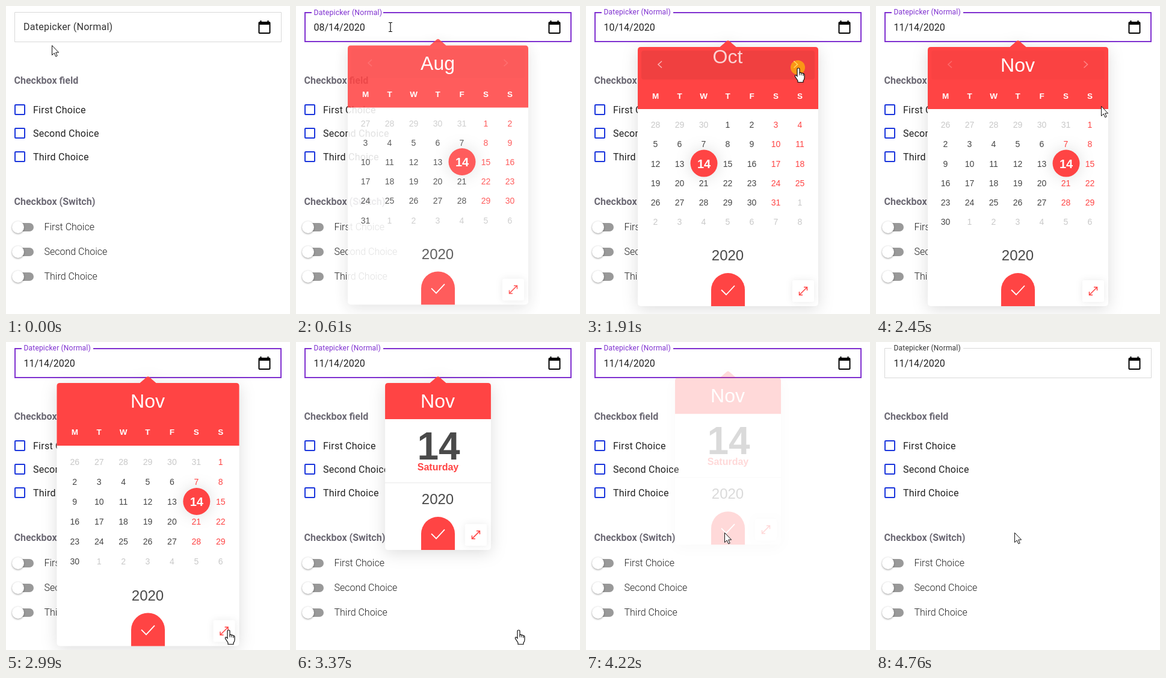
An HTML page that plays this animation: 472x511 px, repeating every 5060 ms.

```html
<!DOCTYPE html>
<html lang="en">
<head>
<meta charset="utf-8">
<title>Date picker</title>
<style>
  html, body { margin: 0; width: 100%; height: 100%; overflow: hidden; background: #fff; }
  svg { display: block; font-family: Roboto, sans-serif; }
  .picker { font-family: "Liberation Sans", Arial, sans-serif; text-anchor: middle; }
  .card { filter: drop-shadow(0 5px 13px #0002); }
  .soft { filter: drop-shadow(0 0 6px #00000014); }
  .day { filter: drop-shadow(0 0 13px #0002); }
  .thumb { filter: drop-shadow(0 1px 1.5px #0006); }
</style>
</head>
<body>
<svg id="stage" width="472" height="511" viewBox="0 0 472 511"></svg>
<script>
const LOOP = 5060, RED = '#ff4444', PURPLE = '#7f30d0';
const TOP = 68, MID = 236;
const HEAD = 60, WEEKDAYS = 43, GRID = 215, SUMMARY = 105, FOOTER = 112;
const MONTHS = ['Aug', 'Sep', 'Oct', 'Nov'];
const CLICKS = [1290, 1540, 1842], UPDATE_DELAY = 200;
const CHOICES = ['First Choice', 'Second Choice', 'Third Choice'];
// time, x, y, cursor shape until the next stop
const STOPS = [
  [0, 76, 65, 'arrow'], [30, 76, 65, 'arrow'], [140, 157, 35, 'beam'],
  [690, 157, 35, 'arrow'], [840, 290, 152, 'hand'],
  [1150, 353, 104, 'hand'], [1450, 353, 103, 'hand'], [2300, 353, 103, 'hand'],
  [2450, 374, 165, 'arrow'], [2780, 367, 468, 'hand'], [2900, 370, 478, 'hand'],
  [3450, 370, 478, 'arrow'], [3660, 353, 451, 'arrow'], [3740, 353, 451, 'arrow'],
  [3940, 233, 314, 'hand'], [4060, 230, 316, 'hand'], [4220, 230, 316, 'arrow'],
  [LOOP, 230, 316, 'arrow']
];
const CURSORS = {
  arrow: '<path d="M.5 .5V16.5L4.2 13 6.8 18.8 9.2 17.7 6.7 12.1H11.6Z" fill="#fff" stroke="#111"/>',
  beam: '<path d="M-3-7.5H-1Q0-7.5 0-6.5Q0-7.5 1-7.5H3M0-6.5V6.5M-3 7.5H-1Q0 7.5 0 6.5Q0 7.5 1 7.5H3" fill="none" stroke="#111" stroke-width="1.2"/>',
  hand: '<path d="M-2 2Q-2 0 0 0T2 2V8Q4 6.5 5 8.5Q7 7.5 8 9.5Q10 9 10 11.5V16Q10 19 8 21V23.5H-1V21L-5.5 14Q-6 11-3.5 12L-2 13.5Z" fill="#fff" stroke="#111" stroke-width="1.2"/><path d="M2 8V12M5 8.5V12M8 9.5V13" stroke="#111"/>'
};

const clamp = v => Math.max(0, Math.min(1, v));
const ramp = (t, from, to) => clamp((t - from) / (to - from));
const mix = (a, b, k) => a + (b - a) * k;

// CSS-style cubic-bezier easing, solved by bisection
function bezier(x1, y1, x2, y2) {
  const at = (s, a, b) => 3 * (1 - s) ** 2 * s * a + 3 * (1 - s) * s * s * b + s ** 3;
  return p => {
    if (p <= 0 || p >= 1) return p;
    let low = 0, high = 1;
    for (let i = 0; i < 24; i++) {
      const s = (low + high) / 2;
      if (at(s, x1, x2) < p) low = s; else high = s;
    }
    return at(low, y1, y2);
  };
}
const ease = bezier(.25, .1, .25, 1);
const spring = bezier(1, -.55, .2, 1.37);

const text = (x, y, str, size, fill, extra = '') =>
  `<text x="${x}" y="${y + size * .36}" font-size="${size}" fill="${fill}" ${extra}>${str}</text>`;
const group = (opacity, body, extra = '') =>
  opacity > 0 ? `<g opacity="${opacity}" ${extra}>${body}</g>` : '';
const line = (d, color, width, extra = '') =>
  `<path d="${d}" fill="none" stroke="${color}" stroke-width="${width}" ${extra}/>`;

function form() {
  const bold = 'font-weight="700"';
  return `<clipPath id="title"><rect x="148" y="${TOP}" width="176" height="${HEAD}"/></clipPath>` +
    text(13.5, 123.5, 'Checkbox field', 16, '#6c6974', bold) +
    text(13.5, 324.5, 'Checkbox (Switch)', 16, '#6c6974', bold) +
    CHOICES.map((label, i) => {
      const y = 172 + 39 * i, s = 367 + 41 * i;
      return `<rect x="15" y="${y - 8}" width="16" height="16" rx="1" fill="none" stroke="#1a35dc" stroke-width="2"/>` +
        text(45, y, label, 16, '#222', 'letter-spacing=".25"') +
        `<rect x="13" y="${s - 7}" width="33" height="14" rx="7" fill="#999"/>` +
        `<circle class="thumb" cx="20" cy="${s}" r="10" fill="#fff"/>` +
        text(63.5, s - .5, label, 16, '#222', 'font-weight="300"');
    }).join('');
}

function field(t, month) {
  const focus = ramp(t, 370, 470) - ramp(t, 4650, 4750);
  const float = 1 - (1 - ramp(t, 380, 770)) ** 3;
  const width = 1 + focus, i = width / 2, size = mix(16, 12, float);
  const tint = base => `color-mix(in srgb, ${PURPLE} ${focus * 100}%, ${base})`;
  const [l, r, top, bottom] = [14 + i, 458 - i, 10 + i, 60 - i];
  const gap = float > 0 ? 145 : 26;
  return `<path d="M26 ${top}H${l}V${bottom}H${r}V${top}H${gap}" fill="none" stroke-width="${width}" style="stroke:${tint('#d8d8d8')}"/>` +
    text(mix(29, 29.5, float), mix(34, 9.3, float), 'Datepicker (Normal)', size, '#333',
      `letter-spacing="${size / 64}" style="fill:${tint('#333')}"`) +
    (t > 440 ? text(29.5, 35.3, `${String(month + 8).padStart(2, '0')}/14/2020`, 16, '#222') : '') +
    '<path transform="translate(417.5 23)" d="M20 3h-1V1h-2v2H7V1H5v2H4c-1.1 0-2 .9-2 2v16c0 1.1.9 2 2 2h16c1.1 0 2-.9 2-2V5c0-1.1-.9-2-2-2zm0 18H4V8h16v13z"/>';
}

function calendar(month, kx, ky) {
  const colX = c => MID + (c * 40 - 120.5) * kx;
  const rowY = y => TOP + HEAD + y * ky;
  let out = [...'MTWTFSS'].map((d, c) => text(colX(c), rowY(21), d, 13.5, '#fff', 'font-weight="700"')).join('');
  let picked = '';
  const lead = (new Date(2020, month + 7, 1).getDay() + 6) % 7;
  for (let n = 0; n < 42; n++) {
    const date = new Date(2020, month + 7, n - lead + 1), day = date.getDate();
    const x = colX(n % 7), y = rowY(69.2 + 32.2 * Math.floor(n / 7));
    const inside = date.getMonth() === month + 7;
    if (inside && day === 14) {
      picked = `<circle class="day" cx="${x + .5}" cy="${y - .5}" r="22.5" fill="${RED}"/>` +
        text(x + .5, y, day, 20, '#fff', 'font-weight="700"');
    } else {
      out += text(x, y, day, 14, !inside ? '#c8c8c8' : n % 7 > 4 ? RED : '#444');
    }
  }
  return picked + out;
}

function monthNames(t) {
  const scroll = CLICKS.reduce((sum, c) => sum + ease(ramp(t, c, c + 400)), 0);
  const names = MONTHS.map((name, i) =>
    group(1 - Math.abs(i - scroll), text(MID - .5, TOP + 29.5 + HEAD * (i - scroll), name, 32, '#fff')));
  return `<g clip-path="url(#title)">${names.join('')}</g>`;
}

function picker(t, month) {
  const open = ease(ramp(t, 380, 780)), close = ease(ramp(t, 4020, 4420));
  const e = spring(ramp(t, 2972, 3372));
  // the calendar collapses while the day summary unfolds; neither goes below zero
  const full = Math.max(0, 1 - e), brief = Math.max(0, e);
  const w = mix(300, 176, e), head = HEAD + WEEKDAYS * full;
  const split = TOP + head + GRID * full;
  const bottom = split + SUMMARY * brief + FOOTER;
  const left = MID - w / 2, right = left + w;
  const hover = (.2 * ramp(t, 380, 600) + .8 * ramp(t, 780, 1050)) * (1 - ramp(t, 2320, 2520));
  const aim = ramp(t, 1000, 1150);

  const body =
    `<g class="card"><rect x="${left}" y="${TOP}" width="${w}" height="${bottom - TOP}" rx="5" fill="#fff"/>` +
    `<path d="M${left} ${TOP + head}V${TOP + 5}q0-5 5-5H222.5L234 58q2-1.5 4 0L249.5 ${TOP}H${right - 5}q5 0 5 5V${TOP + head}Z" fill="${RED}"/></g>` +
    group(hover,
      '<rect x="92" y="74" width="288" height="48" rx="4" fill="#000" fill-opacity=".06"/>' +
      line('M126 91.5L120 97L126 102.5', '#fff', 1.6, 'opacity=".6"') +
      line('M345.5 91.5L351.5 97L345.5 102.5', '#fff', 1.6, `opacity="${mix(.6, 1, aim)}"`)) +
    group(clamp(full), calendar(month, w / 300, full)) +
    group(clamp(brief),
      text(MID + 1, split + 44 * brief, '14', 64, '#4a4a4a', 'font-weight="700"') +
      text(MID, split + 79 * brief, 'Saturday', 16, RED, 'font-weight="700"') +
      line(`M${left} ${split + SUMMARY * brief + .5}H${right}`, '#eee', 1.5)) +
    monthNames(t) +
    text(MID - .5, bottom - 84.5, '2020', 24, '#4a4a4a') +
    `<path d="M208 ${bottom}v-27a28 28 0 0 1 56 0v27Z" fill="${RED}"/>` +
    line(`M225 ${bottom - 27}l8 8l14-15`, '#fff', 1.8) +
    `<rect class="soft" x="${right - 43}" y="${bottom - 43}" width="36" height="36" rx="3" fill="#fff"/>` +
    line(`M${right - 31.5} ${bottom - 18.5}l13-13m-5.5 0h5.5v5.5m-13 2v5.5h5.5`, RED, 1.5);
  return group(open * (1 - close), body, `class="picker" transform="translate(0 ${-20 * (1 - open) - 11 * close})"`);
}

function pointer(t) {
  const i = STOPS.findIndex(s => s[0] > t);
  const [t0, x0, y0, shape] = STOPS[i - 1], [t1, x1, y1] = STOPS[i];
  const p = ramp(t, t0, t1);
  const pressed = CLICKS.some(c => t > c - 50 && t < c + 110);
  return (pressed ? '<circle cx="352" cy="102" r="12" fill="#ffc400" fill-opacity=".65"/>' : '') +
    `<g transform="translate(${mix(x0, x1, p)} ${mix(y0, y1, p)})">${CURSORS[shape]}</g>`;
}

const stage = document.getElementById('stage'), backdrop = form();
function draw() {
  const t = performance.now() % LOOP;
  const month = CLICKS.filter(c => t >= c + UPDATE_DELAY).length;
  stage.innerHTML = backdrop + field(t, month) + picker(t, month) + pointer(t);
  requestAnimationFrame(draw);
}
draw();
</script>
</body>
</html>
```
